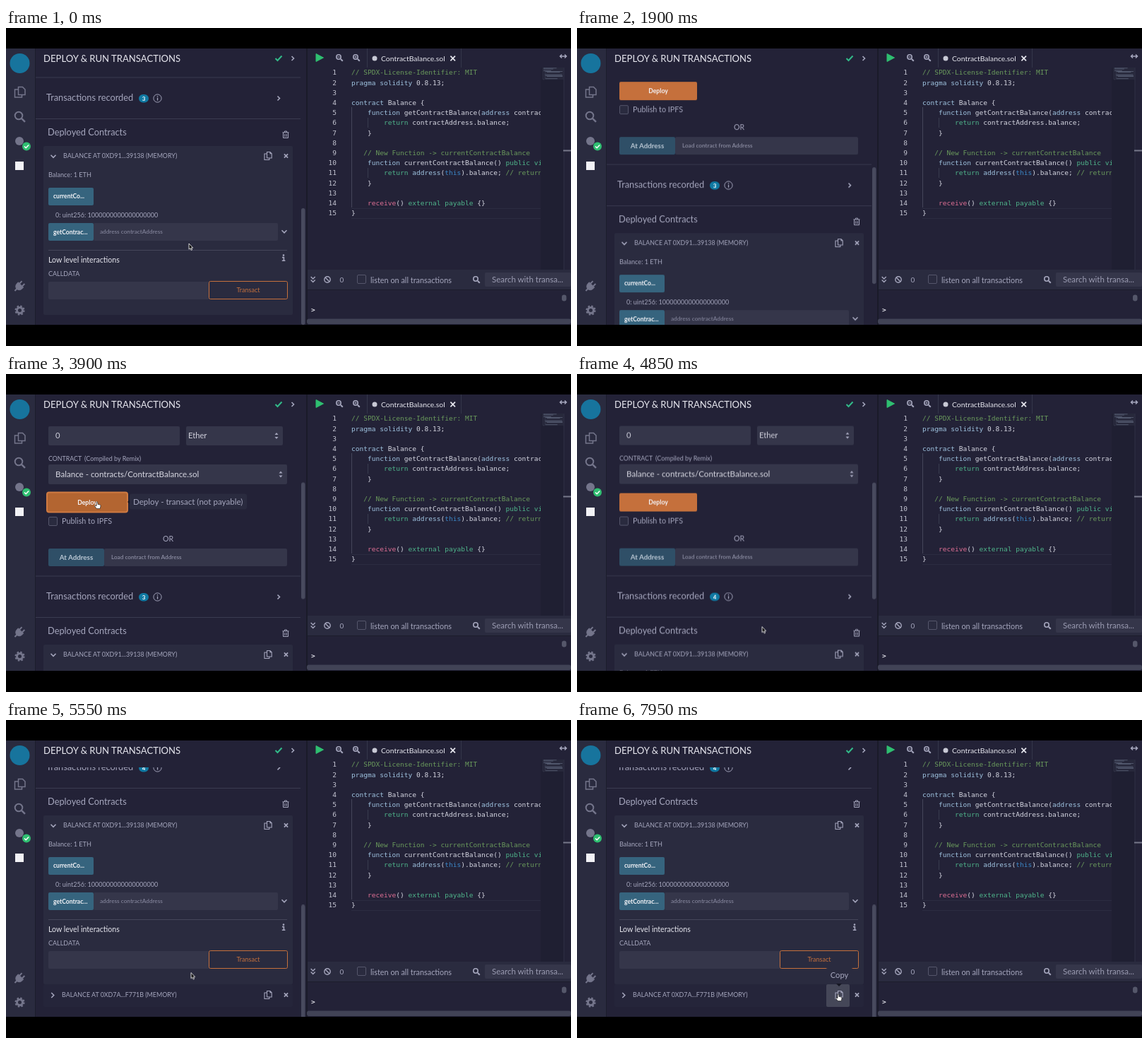
An HTML page that plays this animation: 800x450 px, repeating every 8000 ms.

```html
<!DOCTYPE html>
<html lang="en">
<head>
<meta charset="utf-8">
<title>Deploy and run transactions</title>
<style>
html, body { margin: 0; width: 100%; height: 100%; overflow: hidden; background: #000; }
svg { display: block; width: 800px; height: 450px; }
text { font-family: Lato, sans-serif; white-space: pre; }
.mono { font-family: "DejaVu Sans Mono", monospace; font-size: 9.55px; }
</style>
</head>
<body>
<svg id="stage" viewBox="0 0 800 450"></svg>
<script>
const LOOP = 8000;
const C = {
  bg: '#232237', bar: '#2a2b3f', row: '#25253a', field: '#35364a', line: '#3a3b50', text: '#a5a6bd',
  dim: '#8b8ca3', white: '#e6e6ee', blue: '#36647e', orange: '#c5703c', green: '#2fbf71'
};

// Drawing helpers; text is placed by its vertical centre.
const rect = (x, y, w, h, fill, more = '') =>
  `<rect x="${x}" y="${y}" width="${w}" height="${h}" fill="${fill}" ${more}/>`;
const circle = (x, y, r, fill, more = '') => `<circle cx="${x}" cy="${y}" r="${r}" fill="${fill}" ${more}/>`;
const label = (x, y, size, str, fill = C.text, more = '') =>
  `<text x="${x}" y="${y + size * 0.35}" font-size="${size}" fill="${fill}" ${more}>${str}</text>`;
const path = (d, stroke = C.text, width = 1.3, fill = 'none', more = '') =>
  `<path d="${d}" stroke="${stroke}" stroke-width="${width}" fill="${fill}" ${more}/>`;
const at = (x, y, body) => `<g transform="translate(${x} ${y})">${body}</g>`;
const group = (id, body) => `<g id="${id}">${body}</g>`;
const BOLD = 'font-weight="700"', MID = 'text-anchor="middle"';

const right = (x, y, s = 3) => path(`M${x - s / 2} ${y - s}l${s} ${s}l${-s} ${s}`, C.text, 1.6);
const down = (x, y, s = 3.5) => path(`M${x - s} ${y - s / 2}l${s} ${s}l${s} ${-s}`, C.text, 1.6);
const cross = (x, y, s = 2.6, color = C.text) =>
  path(`M${x - s} ${y - s}l${2 * s} ${2 * s}M${x + s} ${y - s}l${-2 * s} ${2 * s}`, color, 1.7);
const copyIcon = (x, y) => at(x, y,
  path('M-1.5 -5.5H3L5.2 -3.3V3H-1.5ZM-1.5 -3H-5V5.5H1.8V3M3 -5.5V-3.2H5.2', C.text, 1.1));
const lens = (x, y, r, color, width = 1.6) =>
  circle(x - 1, y - 1, r, 'none', `stroke="${color}" stroke-width="${width}"`) +
  path(`M${x + r * 0.6} ${y + r * 0.6}l${r * 0.9} ${r * 0.9}`, color, width + 0.4);
const stepper = (x, y) =>
  path(`M${x - 2.5} ${y - 1.5}l2.5 -3l2.5 3ZM${x - 2.5} ${y + 1.5}l2.5 3l2.5 -3Z`, 'none', 0, C.text);
const button = (x, y, w, h, str, size, fill = C.blue, color = '#f4f4f8') =>
  rect(x, y, w, h, fill, 'rx="2"') + label(x + w / 2, y + h / 2, size, str, color, `${BOLD} ${MID}`);
const checkbox = (x, y) => rect(x + .5, y + .5, 12, 12, C.bar, 'rx="1.5" stroke="#55566b"');
const divider = y => rect(41, y, 376, 1, C.line);

function sidebar() {
  const grey = '#74758b';
  return rect(0, 29, 41, 391, C.bar) + rect(41, 29, 1, 391, '#1c1d2c') +
    circle(19.5, 50, 14, '#17749d') +
    at(19.5, 90.5, path('M-2 -7H4L7.5 -3.5V4H-2ZM-2 -3.5H-7V7.5H3V4', grey, 1.5)) +
    lens(19, 125, 5.3, grey, 2) +
    circle(19, 160, 6, grey) + circle(29, 167.5, 6, C.green) +
    path('M26 167.5l2.2 2.2l4 -4.2', '#fff', 1.5) +
    rect(13, 189, 12, 12, '#f2f2f6') +
    at(19.5, 365, `<g transform="rotate(45)">${path('M-5 -2H5V1A5 5 0 0 1 -5 1Z', grey, 1, grey)}${
      path('M-2.7 -2V-7M2.7 -2V-7M0 5V10', grey, 2)}</g>`) +
    at(19.5, 399.5, circle(0, 0, 4, 'none', `stroke="${grey}" stroke-width="3"`) +
      circle(0, 0, 6, 'none', `stroke="${grey}" stroke-width="2.2" stroke-dasharray="2.5 2.21"`));
}

function contractRow(y, str, x) {
  return label(x, y, 8.9, str) + copyIcon(371, y) + cross(396.5, y);
}

function panelContent() {
  return rect(60, -142, 186, 27, C.field, 'rx="2"') + label(70, -128.5, 11.2, '0', '#d0d0dc') +
    rect(255, -142, 137, 27, C.field, 'rx="2"') + label(258, -128.5, 11.2, 'Ether', '#d0d0dc') + stepper(383, -128.5) +
    label(60, -96, 8.8, 'CONTRACT') + label(111, -96, 9, '(Compiled by Remix)') +
    rect(60, -88, 338, 28, C.field, 'rx="2"') +
    label(70, -74, 11.6, 'Balance - contracts/ContractBalance.sol', '#d6d6e0') + stepper(389, -74) +
    button(60, -47, 110, 26, 'Deploy', 8.7, C.orange) +
    checkbox(60, -14) + label(79, -7.5, 10.8, 'Publish to IPFS') +
    label(229.5, 17, 10.6, 'OR', C.text, MID) +
    rect(139, 31, 259, 25, C.field, 'rx="2"') +
    button(60, 31, 79, 25, 'At Address', 9.8, '#2f4f67', '#b9c6d3') +
    label(149, 43.5, 8.25, 'Load contract from Address', '#9b9cb2') +
    divider(69.5) +
    label(57, 99, 12.8, 'Transactions recorded') +
    rect(188, 94, 14, 11.5, '#1079a2', 'rx="5.7"') +
    group('three', label(195, 100, 8, '3', '#fff', `${BOLD} ${MID}`)) +
    group('four', label(195, 100, 8, '4', '#fff', `${BOLD} ${MID}`)) +
    circle(214.5, 99.5, 5.6, 'none', `stroke="${C.text}"`) + rect(213.9, 98.6, 1.3, 4, C.text) + circle(214.5, 96.8, .8, C.text) +
    right(386, 99.5) + divider(128) +
    label(59, 148, 12.8, 'Deployed Contracts') +
    at(396, 151, path('M-4.5 -3.2H4.5M-1.5 -3.2V-5H1.5V-3.2M-3.5 -3V4.5H3.5V-3M-1.2 -1V3M1.2 -1V3', C.text, 1)) +
    rect(53, 167, 353, 239, C.bar, 'rx="2"') + down(67, 181.5) +
    contractRow(181, 'BALANCE AT 0XD91...39138 (MEMORY)', 81) +
    label(60, 208, 9.1, 'Balance: 1 ETH') +
    rect(60, 226, 64, 25, C.blue, 'rx="2"') + label(67, 238.5, 8.5, 'currentCo...', '#f4f4f8', BOLD) +
    label(70, 265, 9.05, '0: uint256: 1000000000000000000') +
    rect(124, 276, 261, 25, C.field, 'rx="2"') +
    rect(60, 276, 64, 25, C.blue, 'rx="2"') + label(67, 288.5, 8.6, 'getContrac...', '#f4f4f8', BOLD) +
    label(133, 288.5, 8.25, 'address contractAddress', C.dim) + down(394, 288) +
    rect(60, 314, 338, 1, '#45465a') +
    label(60, 328.5, 10.6, 'Low level interactions', C.white) +
    circle(393, 321.6, 1.3, C.text) + path('M391 324.6H393.4V329M390.8 329.3H395.4', C.text, 1.6) +
    label(60, 347.5, 9, 'CALLDATA') +
    rect(60, 359, 228, 25, C.field, 'rx="2"') +
    rect(287.5, 358.5, 111, 25, C.bar, `rx="2" stroke="${C.orange}"`) + label(343, 371, 9, 'Transact', C.orange, MID) +
    group('newRow', rect(53, 406, 353, 32, C.row, 'rx="2"') + right(66, 421.5, 3.5) +
      contractRow(421, 'BALANCE AT 0XD7A...F771B (MEMORY)', 79));
}

function panel() {
  return rect(42, 29, 383, 391, C.bg) +
    `<g clip-path="url(#panelClip)">${group('scroll', panelContent())}${
      group('thumb', rect(418, 255, 5.5, 165, '#484a5e', 'rx="2.7"'))}</g>` +
    label(53, 43, 13.1, 'DEPLOY &amp; RUN TRANSACTIONS', C.white) +
    path('M381.5 43l3 3l6 -6.5', '#32ba89', 2) + right(406, 43);
}

const SYNTAX = { k: '#9fc3e0', g: '#4fb58b', b: '#3c87c8', p: '#de6f94', c: '#6a9a5c' };
const CODE = `{c|// SPDX-License-Identifier: MIT}
{k|pragma solidity} 0.8.13;

{k|contract} Balance [
    {k|function} getContractBalance({k|address} contractAddress)
        {g|return} contractAddress.balance;
    ]

   {c|// New Function -> currentContractBalance}
    {k|function} currentContractBalance() {g|public} {g|view}
        {g|return} {k|address}({b|this}).balance; {c|// returns}
    ]

    {p|receive}() {g|external} {g|payable} []
]`.split('\n');

function codeLine(src, i) {
  const y = 66.4 + i * 14.2;
  const body = src.replace(/>/g, '&gt;')
    .replace(/\{(\w)\|([^}]*)\}/g, (_, key, s) => `<tspan fill="${SYNTAX[key]}">${s}</tspan>`)
    .replace(/\[/g, '{').replace(/\]/g, '}');
  return `<text class="mono" x="468" y="${y}" text-anchor="end" fill="#c4c5d2">${i + 1}</text>
    <text class="mono" x="489" y="${y}" fill="#d6d7e2" clip-path="url(#codeClip)">${body}</text>`;
}

function minimap() {
  return CODE.map((s, i) => {
    const length = s.replace(/\{\w\||\}/g, '').trim().length;
    const indent = s.search(/\S/);
    return length ? rect(761 + indent * .6, 56.5 + i * 1.15, Math.min(length * .6, 27 - indent * .6), .7, '#626a80') : '';
  }).join('');
}

function editor() {
  return rect(425, 29, 375, 391, C.bg) + rect(425, 29, 2, 391, '#1a1b29') +
    rect(511, 29, 1, 27, '#34364a') + rect(644, 29, 1, 27, '#34364a') +
    path('M439 36.5L449.5 42L439 47.5Z', C.green, 1, C.green) +
    lens(472, 42, 3.2, C.text) + path('M469.4 41h3.2', C.text, 1.1) +
    lens(496, 42, 3.2, C.text) + path('M493.4 41h3.2M495 39.4v3.2', C.text, 1.1) +
    circle(522, 43, 3.5, '#c8c9d5') + label(531, 43, 10.4, 'ContractBalance.sol', C.white) +
    cross(632.7, 43, 3.3, C.white) +
    path('M784.5 40H793.5M787 37.5L784.5 40L787 42.5M791 37.5L793.5 40L791 42.5', C.text, 1.5) +
    rect(489, 112, 1, 142, '#44465a') + rect(512, 127, 1, 14, '#393b4f') + rect(512, 198, 1, 14, '#393b4f') +
    path('M489 255.5H757M489 269.5H757', '#2b2c41', 1) +
    CODE.map(codeLine).join('') +
    rect(757, 56, 33, 286, '#1f1f32') + rect(759, 56, 31, 17, '#27283b') + minimap() +
    rect(789.5, 56, 1, 286, '#303146') + rect(789, 172.5, 11, 2, '#77788a');
}

function terminal() {
  return rect(427, 342, 373, 29, C.bar) + rect(427, 371, 373, 49, C.bg) + rect(427, 370, 373, 1, '#1c1d2c') +
    path('M431.7 352l3 3l3 -3M431.7 356.5l3 3l3 -3', C.text, 1.4) +
    circle(455, 356, 4.2, 'none', `stroke="${C.text}" stroke-width="1.4"`) + path('M452 353l6 6', C.text, 1.4) +
    label(472.5, 356, 10, '0') + checkbox(497, 349) +
    label(516, 357, 10.9, 'listen on all transactions') +
    lens(666, 356, 3.2, C.text) + rect(678, 346, 122, 20, C.field, 'rx="2"') +
    label(688, 356, 11.5, 'Search with transa...', '#9b9cb2') +
    `<text class="mono" x="432" y="402" font-weight="700" fill="#e0e0e8">&gt;</text>` +
    rect(787, 377.5, 6.5, 9, '#55576a', 'rx="3.2"') + rect(426, 411.5, 374, 7.5, '#414356', 'rx="3"');
}

function overlays() {
  const deploy = rect(58, 167.5, 114, 28, '#b36531', 'rx="3" stroke="#d07b42" stroke-width="2"') +
    label(115, 181.5, 8.7, 'Deploy', '#f4f4f8', `${BOLD} ${MID}`) +
    path('M176 177.5l-4 3.5l4 3.5Z', 'none', 0, '#151622') +
    rect(175, 169.5, 166, 22, C.bar, 'rx="3"') +
    label(180, 180.5, 11.6, 'Deploy - transact (not payable)');
  const copy = rect(353, 374, 33, 32, '#454758', 'rx="2"') + copyIcon(371, 389) +
    rect(352, 351, 39, 22, C.bar, 'rx="3"') + path('M367 373h8l-4 4Z', 'none', 0, '#151622') +
    label(371.5, 361.5, 11.2, 'Copy', C.text, MID);
  const arrow = path('M0 0V8.2L1.9 6.6L3.2 9.4L4.6 8.8L3.3 6.1H5.7Z', '#fff', .8, '#111');
  const hand = path('M-1 -4.5Q0 -5.6 .9 -4.5V-1.6L4.4 -.9Q5.2 -.3 5 1L4.2 4.6H-.6L-3.4 1Q-3.4 -.5 -1.9 .2L-1 1Z', '#222', .7, '#fff');
  return group('deployHover', deploy) + group('copyHover', copy) +
    group('cursor', group('arrow', arrow) + group('hand', hand));
}

const stage = document.getElementById('stage');
stage.innerHTML = `<defs>
    <clipPath id="panelClip"><rect x="41" y="67" width="384" height="353"/></clipPath>
    <clipPath id="codeClip"><rect x="486" y="56" width="271" height="286"/></clipPath>
  </defs>` + rect(0, 0, 800, 450, '#000') + panel() + sidebar() + editor() + terminal() + overlays() +
  rect(0, 420, 800, 30, '#000');

const play = (id, frames) =>
  document.getElementById(id).animate(frames, { duration: LOOP, iterations: Infinity });
const move = (id, steps) => play(id, steps.map(([ms, x, y, easing = 'linear']) =>
  ({ offset: ms / LOOP, transform: `translate(${x}px, ${y}px)`, easing })));
const toggle = (id, steps) => play(id, [...steps, [LOOP, steps.at(-1)[1]]].map(([ms, opacity]) =>
  ({ offset: ms / LOOP, opacity, easing: 'step-end' })));

const SCROLL = [[0, 0], [1350, 0], [1500, 32], [1800, 105], [2300, 195], [2700, 216],
  [4850, 216], [5150, 71], [5350, -10], [5500, -32], [LOOP, -32]];
move('scroll', SCROLL.map(([ms, y]) => [ms, 0, y]));
move('thumb', SCROLL.map(([ms, y]) => [ms, 0, ms < 4900 ? -y * .47 : -8 - y * .45]));

move('cursor', [[0, 259, 305], [2850, 259, 305, 'ease-in-out'], [3400, 129, 186], [4350, 129, 186, 'ease-in-out'],
  [4800, 262, 357.5], [6400, 262, 357.5, 'ease-in-out'], [7050, 370, 393], [LOOP, 370, 393]]);
toggle('cursor', [[0, 1], [1100, 0], [2850, 1]]);
toggle('arrow', [[0, 1], [3250, 0], [4450, 1], [6950, 0]]);
toggle('hand', [[0, 0], [3250, 1], [4450, 0], [6950, 1]]);
toggle('deployHover', [[0, 0], [3300, 1], [4450, 0]]);
toggle('copyHover', [[0, 0], [7000, 1]]);
toggle('three', [[0, 1], [4300, 0]]);
toggle('four', [[0, 0], [4300, 1]]);
toggle('newRow', [[0, 0], [4300, 1]]);
</script>
</body>
</html>
```
